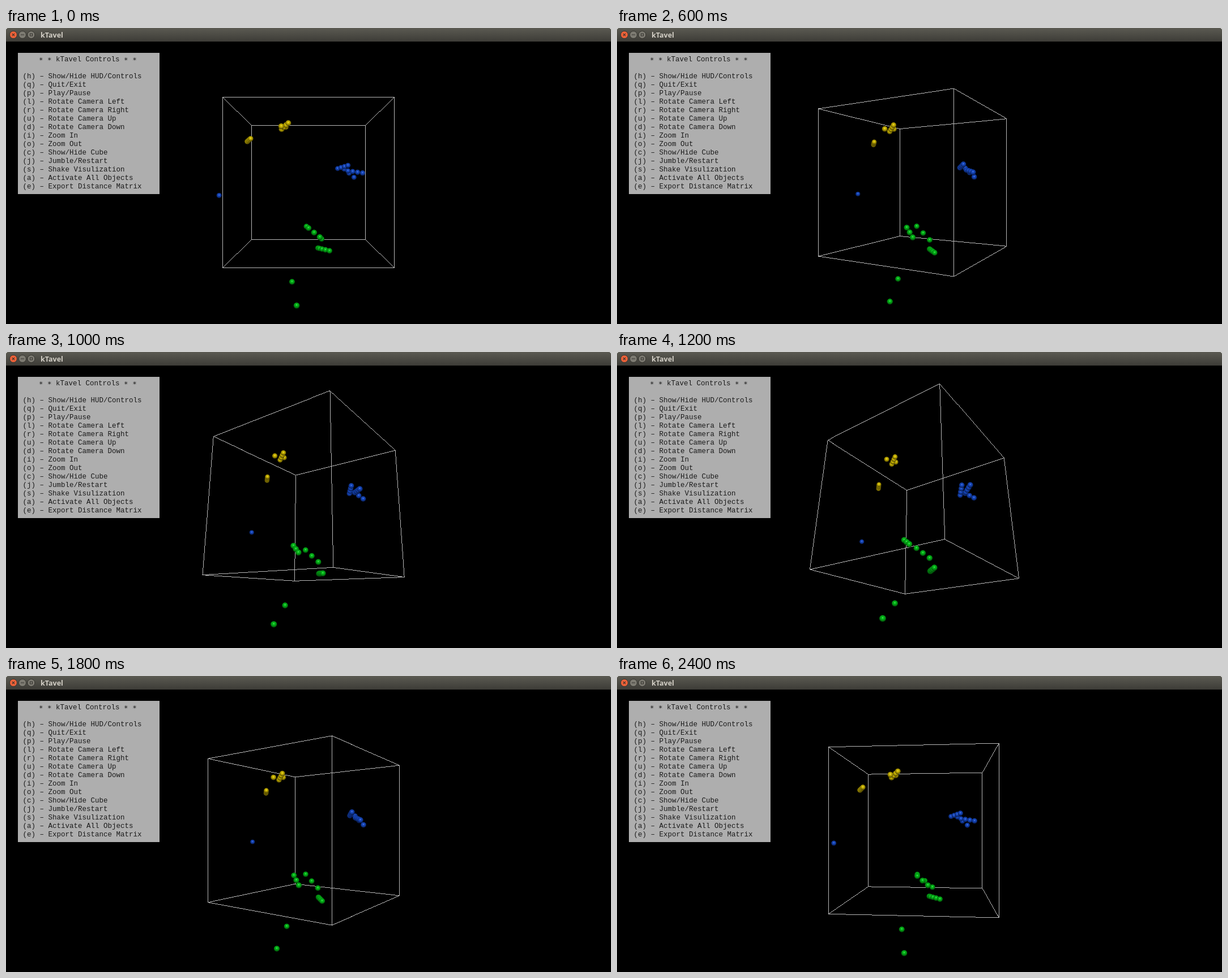
These frames come from a looping animation (1068x524 px, 2500 ms). An HTML page:

```html
<!DOCTYPE html>
<html lang="en">
<head>
<meta charset="utf-8">
<title>Cluster viewer</title>
<style>
  html, body { margin: 0; width: 100%; height: 100%; overflow: hidden; background: #000; }
  svg { display: block; width: 100vw; height: 100vh; }
  .title { font: 700 12.5px "Open Sans", "Noto Sans", sans-serif; fill: #d2cec5; }
  .hud { font: 12.5px "Liberation Mono", "Noto Sans Mono", monospace; fill: #000; fill-opacity: .85; }
  .star { font-family: "DejaVu Sans Mono", monospace; }
</style>
</head>
<body>
<svg viewBox="0 0 1068 524">
  <defs>
    <linearGradient id="bar" x2="0" y2="1">
      <stop offset="0" stop-color="#5b5a52"/>
      <stop offset="1" stop-color="#3d3c37"/>
    </linearGradient>
  </defs>
  <rect width="1068" height="524"/>
  <rect width="1068" height="6" fill="#fff"/>
  <path d="M0 24V4Q0 0 4 0H1064Q1068 0 1068 4V24Z" fill="url(#bar)"/>
  <g stroke="#34332e">
    <circle cx="13" cy="12" r="6.5" fill="#ee6239"/>
    <circle cx="29" cy="12" r="6.5" fill="#7d7b72"/>
    <circle cx="44.5" cy="12" r="6.5" fill="#7d7b72"/>
    <path d="M10.8 9.8l4.4 4.4m0-4.4l-4.4 4.4M26 12h6M42.5 10h4v4h-4z" fill="none" stroke-width="1.2"/>
  </g>
  <text class="title" x="61" y="17">kTavel</text>
  <path id="cube" fill="#b8b8b8" shape-rendering="crispEdges"/>
  <g id="balls"></g>
  <rect x="21" y="44" width="250" height="250" fill="#aeaeae"/>
  <g id="hud" class="hud">
    <text x="58" y="59"><tspan class="star" dy="2">* *</tspan><tspan dy="-2"> kTavel Controls </tspan><tspan class="star" dy="2">* *</tspan></text>
  </g>
</svg>
<script>
const STEP = 100, STEPS = 25, TURN = 5 * Math.PI / 180;
const CX = 534, CY = 273.5, FOCAL = 604.8, DIST = 5, RADIUS = 0.04;

const controls = [
  "(h) – Show/Hide HUD/Controls", "(q) – Quit/Exit", "(p) – Play/Pause",
  "(l) – Rotate Camera Left", "(r) – Rotate Camera Right",
  "(u) – Rotate Camera Up", "(d) – Rotate Camera Down",
  "(i) – Zoom In", "(o) – Zoom Out", "(c) – Show/Hide Cube",
  "(j) – Jumble/Restart", "(s) – Shake Visulization",
  "(a) – Activate All Objects", "(e) – Export Distance Matrix"
];

const byId = id => document.getElementById(id);
const mix = (a, b, t) => a.map((v, i) => v + (b[i] - v) * t);

function set(el, attrs) {
  for (const key in attrs) el.setAttribute(key, attrs[key]);
}

function add(parent, tag, attrs) {
  const el = document.createElementNS("http://www.w3.org/2000/svg", tag);
  set(el, attrs);
  return parent.appendChild(el);
}

// A strand spreads balls between two points; a power above 1 crowds its start.
function strand(count, from, to, power = 1) {
  return Array.from({ length: count }, (_, i) => mix(from, to, (i / (count - 1)) ** power));
}

// Points are in cube units; the cube spans -1 to 1.
const clusters = {
  green: {
    tones: ["#70e87e", "#05c01a", "#039413", "#003205"],
    at: [
      ...strand(2, [-.23, -1.39, .22], [-.155, -1.61, .53]),
      ...strand(3, [-.03, -.64, .03], [.19, -.82, .04]),
      ...strand(3, [0, -.62, .35], [.15, -.73, .44]),
      ...strand(5, [.14, -.97, -.05], [.3, -.98, .1], 1.5)
    ]
  },
  blue: {
    tones: ["#7398ee", "#184bc6", "#113a9a", "#041036"],
    at: [
      [-1.37, -.2, -.25],
      ...strand(4, [.46, .22, -.41], [.6, .26, -.21]),
      ...strand(3, [.56, .21, -.38], [.71, .08, -.35]),
      ...strand(4, [.61, .18, -.3], [.8, .14, -.07])
    ]
  },
  yellow: {
    tones: ["#f6e56c", "#d4be02", "#a08e01", "#352e00"],
    at: [
      ...strand(4, [-.91, .61, -.09], [-.85, .645, -.03]),
      ...strand(4, [-.375, .745, .22], [-.28, .825, .26]),
      ...strand(2, [-.37, .765, .35], [-.32, .78, .19])
    ]
  }
};

controls.forEach((line, i) => {
  add(byId("hud"), "text", { x: 29.5, y: 89 + 15 * i }).textContent = line;
});

const ballLayer = byId("balls");
const balls = Object.entries(clusters).flatMap(([name, { tones, at }]) => {
  const shade = add(document.querySelector("defs"), "radialGradient", { id: name, cx: .5, cy: .4, r: .62 });
  tones.forEach((tone, i) =>
    add(shade, "stop", { offset: (i / 3) ** 1.4, "stop-color": tone }));
  return at.map(pos => ({ pos, el: add(ballLayer, "circle", { fill: `url(#${name})` }) }));
});

// Corners are numbered by bits; an edge joins corners that differ in one bit.
const corners = [...Array(8).keys()].map(i => [0, 1, 2].map(b => (i >> b & 1) * 2 - 1));
const edges = corners.flatMap((_, i) =>
  [1, 2, 4].filter(bit => !(i & bit)).map(bit => [i, i | bit]));

function project([x, y, z], yaw, pitch) {
  const x1 = x * Math.cos(yaw) - z * Math.sin(yaw);
  const z1 = z * Math.cos(yaw) + x * Math.sin(yaw);
  const y2 = y * Math.cos(pitch) + z1 * Math.sin(pitch);
  const z2 = z1 * Math.cos(pitch) - y * Math.sin(pitch);
  const scale = FOCAL / (DIST - z2);
  return [CX + x1 * scale, CY - y2 * scale, scale];
}

// Hard-edged line, one pixel per step along its longer axis.
function pixelLine(a, b) {
  const steps = Math.ceil(Math.max(Math.abs(b[0] - a[0]), Math.abs(b[1] - a[1])));
  let path = "";
  for (let i = 0; i <= steps; i++) {
    const [x, y] = mix(a, b, i / steps).map(Math.floor);
    path += `M${x} ${y}h1v1h-1z`;
  }
  return path;
}

// The camera turns, tilts up and back, rests one step, then returns.
function pitchSteps(n) {
  const fall = n < 15 ? 17 - n : 18 - n;
  return Math.max(0, Math.min(n - 7, fall));
}

function draw(n) {
  const yaw = Math.min(n, 7, STEPS - n) * TURN;
  const pitch = pitchSteps(n) * TURN;
  const points = corners.map(c => project(c, yaw, pitch));
  set(byId("cube"), { d: edges.map(([i, j]) => pixelLine(points[i], points[j])).join("") });
  for (const ball of balls) {
    const [cx, cy, scale] = project(ball.pos, yaw, pitch);
    ball.scale = scale;
    set(ball.el, { cx, cy, r: RADIUS * scale });
  }
  // Far balls first, so near ones cover them.
  balls.sort((a, b) => a.scale - b.scale).forEach(ball => ballLayer.appendChild(ball.el));
}

const start = performance.now();
let shown = -1;

function tick() {
  const n = Math.floor((performance.now() - start) / STEP) % STEPS;
  if (n !== shown) draw(shown = n);
  requestAnimationFrame(tick);
}
tick();
</script>
</body>
</html>
```
